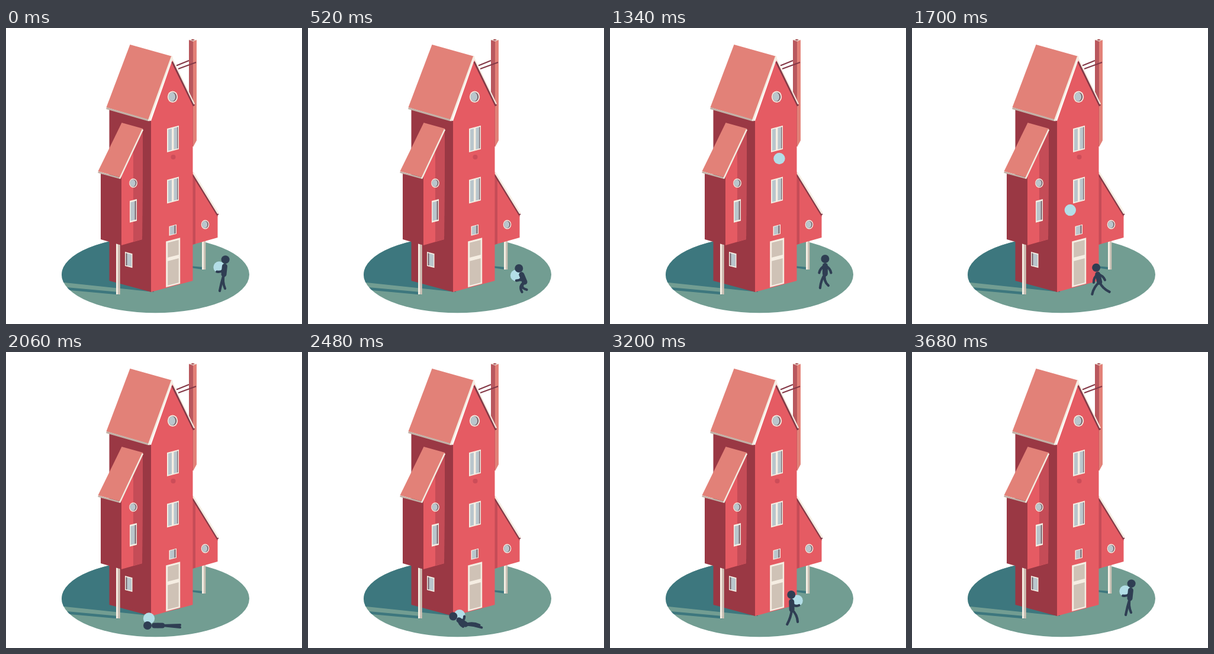
An HTML page that plays this animation: 500x500 px, repeating every 4.08 s.

```html
<!DOCTYPE html>
<html lang="en">
<head>
<meta charset="utf-8">
<title>Red house ball game</title>
<style>
  html, body { margin: 0; width: 100%; height: 100%; overflow: hidden; background: #fff; }
  svg { display: block; width: 100%; height: 100%; }
  .dark { fill: #9a3844; }
  .mid { fill: #c54c57; }
  .red { fill: #e55b63; }
  .roof { fill: #e28178; }
  .cream { fill: #f5ede2; }
  .sand { fill: #cfc2b6; }
  .glass { fill: #b9c6cc; }
  .dim { fill: #7a6069; }
  .shade { fill: #3d777e; }
  .trim { stroke: #f5ede2; }
  .eave { stroke: #c3b1a7; }
  .under { stroke: #843a47; }
  .person { fill: none; stroke: #2f3e53; stroke-linecap: round; }
</style>
</head>
<body>
<svg viewBox="0 0 500 500">
  <defs>
    <clipPath id="ground"><ellipse cx="252.5" cy="416.600" rx="158.500" ry="64.600"/></clipPath>
    <g id="tall">
      <path class="cream" d="M0 0h20v40H0z"/>
      <path class="glass" d="M2 2h6v36H2zM11.500 2H18v36h-6.500z"/>
      <path class="dim" d="M17.200 2h1.300v36h-1.300z"/>
    </g>
    <g id="pane">
      <path class="cream" d="M0 0h12.500v16H0z"/>
      <path class="glass" d="M1.500 1.200h9.500v13.600H1.500z"/>
      <path class="dim" d="M9 1.200h2v13.600H9z"/>
    </g>
    <g id="round">
      <ellipse class="cream" rx="8.600" ry="9.800"/>
      <ellipse class="dim" rx="6.800" ry="7.900"/>
      <ellipse class="glass" cx="-1" rx="5.700" ry="7.500"/>
    </g>
  </defs>

  <g clip-path="url(#ground)">
    <path d="M90 350h330v140H90z" fill="#729d92"/>
    <path class="shade" d="M90 350H250V446L90 429z"/>
    <path class="shade" d="M90 437L190 446V450.500L90 441.500zM312 402L333 404V408L312 405z"/>
  </g>

  <!-- chimney -->
  <path d="M309 20l7 2v178h-7z" fill="#b9585e"/>
  <path class="roof" d="M316 22l6-2v170l-6 11z"/>
  <path class="cream" d="M309 20l6-2 7 2-6 2.500z"/>
  <path class="dark" d="M312 20l3.500-1 3.500 1-3.500 1.200z"/>
  <path d="M288 63.500l21-8.500M291 69l30-11" stroke="#843947" stroke-width="2"/>

  <!-- right annex -->
  <path class="cream" d="M331 358h3.500v50H331z"/>
  <path class="sand" d="M334.500 358h2.700v50h-2.700z"/>
  <path class="red" d="M315 243L357.500 313V354L315 366z"/>
  <path class="mid" d="M315 243L357.500 313v6L320 257V364.500L315 366z"/>
  <path class="under" d="M316 248L358 316" stroke-width="3.500"/>
  <path class="trim" d="M316 244L358.500 313.500" stroke-width="3"/>

  <!-- tower -->
  <path class="dark" d="M174.500 136L245 157V446L174.500 427z"/>
  <path class="red" d="M245 157L281 54L315.500 127V427L245 446z"/>
  <path class="under" d="M281 57L317.500 131.500" stroke-width="3.500"/>
  <path class="trim" d="M280.500 51L318 128.500" stroke-width="2"/>
  <path class="roof" d="M209.500 28L281 48L241 155L169.500 134z"/>
  <path class="eave" d="M169.500 135.500L241 156" stroke-width="3"/>
  <path class="trim" d="M280.500 48L241 157" stroke-width="3"/>

  <!-- left annex -->
  <path class="cream" d="M186 362h3.500v88H186z"/>
  <path class="sand" d="M189.500 362h3.200v88h-3.200z"/>
  <path class="dark" d="M160 246L195 253V367L160 357z"/>
  <path class="red" d="M195 250L231 175L230 357L195 367z"/>
  <path class="mid" d="M215 209L231 175L230 357L215 361z"/>
  <path class="roof" d="M195.500 160L231.500 170L192 252L155.500 242z"/>
  <path class="eave" d="M155.500 243.500L192 253.500" stroke-width="2.500"/>
  <path class="trim" d="M231 171.500L192 254.500" stroke-width="2.500"/>

  <!-- openings -->
  <use href="#round" x="281.500" y="116.300"/>
  <use href="#round" transform="translate(336.500 332) scale(.79)"/>
  <use href="#round" transform="translate(215 262) scale(.8)"/>
  <use href="#tall" transform="matrix(1 -.26 0 1 272 170)"/>
  <use href="#tall" transform="matrix(1 -.26 0 1 272 256.500)"/>
  <use href="#pane" transform="matrix(.96 -.24 0 2.300 209 292)"/>
  <use href="#pane" transform="matrix(1 -.26 0 1 275.500 335)"/>
  <use href="#pane" transform="matrix(-1 -.26 0 1.500 213.500 381.300)"/>
  <g transform="matrix(1 -.26 0 1 270.200 360.500)">
    <path class="cream" d="M0 0h24v77.500H0z"/>
    <path class="sand" d="M3 3h18.500v25H3zM3 34h18.500v41H3z"/>
  </g>
  <circle cx="282.500" cy="218" r="4" fill="#cc4d59"/>

  <circle id="ball" r="9.700" fill="#b3dee7"/>
  <g class="person">
    <path id="limbs" stroke-width="4.200"/>
    <path id="torso" stroke-width="9"/>
    <circle id="head" r="7" fill="#2f3e53" stroke="none"/>
  </g>
</svg>
<script>
const LOOP = 4080;
const $ = id => document.getElementById(id);

const linear = u => u;
const smooth = u => u * u * (3 - 2 * u);
const rise = u => u * (2 - u);
const fall = u => u * u;
const late = u => u ** 4;

// legs: middle of the feet seen from the hip; body: lean in degrees, spread of the feet
const pose = (hip, body, legs, ball) => ({ hip, body, legs, ball });
const stand  = pose([368, 416], [6, 4.5], [-2.5, 26], [360, 404]);
const crouch = pose([366, 429], [-23, 4], [-0.5, 15], [351.5, 418]);
const toss   = pose([366, 417], [-10, 6], [-3, 23], [350, 378]);
const watch  = pose([363.5, 415], [0, 7], [-1.5, 22], [286, 220.5]);
const dive   = pose([291, 437], [-75, 0], [20, 2], [257, 430]);
const lie    = pose([264, 462], [-90, 0], [30, 1], [241.5, 450]);
const sit    = pose([270, 457], [-1, -5], [17, 7], [280, 436]);
const walk   = pose([307, 435], [-2, 9], [1, 23], [316, 420]);

// [time, pose, easing towards it, easing of the posture, easing of the ball's height]
const timeline = [
  [0, stand], [520, crouch, smooth], [800, crouch], [960, toss],
  [1340, watch, linear, linear, rise], [1900, dive, linear, late, fall],
  [2060, lie], [2340, lie], [2680, sit, smooth], [2870, sit],
  [3200, walk], [3680, stand], [LOOP, stand]
];

const lerp = (a, b, u) => a + (b - a) * u;
const clamp = (v, lo, hi) => Math.min(hi, Math.max(lo, v));
const mix = (a, b, ux, uy = ux) => [lerp(a[0], b[0], ux), lerp(a[1], b[1], uy)];
const add = (a, b) => [a[0] + b[0], a[1] + b[1]];
const pulse = (t, a, b) => Math.sin(Math.PI * clamp((t - a) / (b - a), 0, 1));

function poseAt(t) {
  const i = timeline.findIndex(key => key[0] > t);
  const [t0, from] = timeline[i - 1];
  const [t1, to, ease = linear, posture = ease, height = ease] = timeline[i];
  const u = (t - t0) / (t1 - t0);
  return {
    hip: mix(from.hip, to.hip, ease(u)),
    body: mix(from.body, to.body, posture(u)),
    legs: mix(from.legs, to.legs, posture(u)),
    ball: mix(from.ball, to.ball, ease(u), height(u))
  };
}

function limb([x, y], [tx, ty], bend) {
  const dx = tx - x, dy = ty - y, k = bend / (Math.hypot(dx, dy) || 1);
  return `M${x} ${y}Q${(x + tx) / 2 - dy * k} ${(y + ty) / 2 + dx * k} ${tx} ${ty}`;
}

function place(id, [x, y]) {
  $(id).setAttribute('cx', x);
  $(id).setAttribute('cy', y);
}

function draw(t) {
  const { hip, body: [lean, spread], legs, ball } = poseAt(t);
  const angle = lean * Math.PI / 180, c = Math.cos(angle), s = Math.sin(angle);
  const tilt = (x, y) => [x * c - y * s, x * s + y * c];
  const shoulder = add(hip, tilt(0, -13.5)), head = add(hip, tilt(0, -25));
  const facing = clamp((ball[0] - head[0]) / 3, -1, 1);

  // Hands hold a ball within reach; on the ground the back arm stays down.
  const reach = Math.hypot(ball[0] - shoulder[0], ball[1] - shoulder[1]);
  const hold = clamp((36 - reach) / 10, 0, 1);
  const grip = add(ball, tilt(3 * facing, 8));
  const arm = side => {
    const w = side === facing ? hold : hold * clamp(legs[1] / 12 - 0.6, 0, 1);
    const rest = add(shoulder, tilt(side * 10 * c, 12));
    return limb(shoulder, mix(rest, grip, w), lerp(-side * 4, facing * 8, w));
  };

  const step = spread + 10 * pulse(t, 1340, 1900) * Math.sin((t - 1340) / 45)
                      - 12 * pulse(t, 3200, 3680);
  const leg = side => {
    const foot = add(hip, add(legs, [side * step, -side * 2]));
    const slack = 30 - Math.hypot(foot[0] - hip[0], foot[1] - hip[1]);
    return limb(hip, foot, -facing * 0.7 * Math.max(0, slack));
  };

  const front = facing < 0 ? -1 : 1;
  place('ball', ball);
  place('head', head);
  $('torso').setAttribute('d', `M${shoulder}L${hip}`);
  $('limbs').setAttribute('d', leg(-1) + leg(1) + arm(front) + arm(-front));
}

const start = performance.now();
function tick() {
  draw((performance.now() - start) % LOOP);
  requestAnimationFrame(tick);
}
tick();
</script>
</body>
</html>
```
